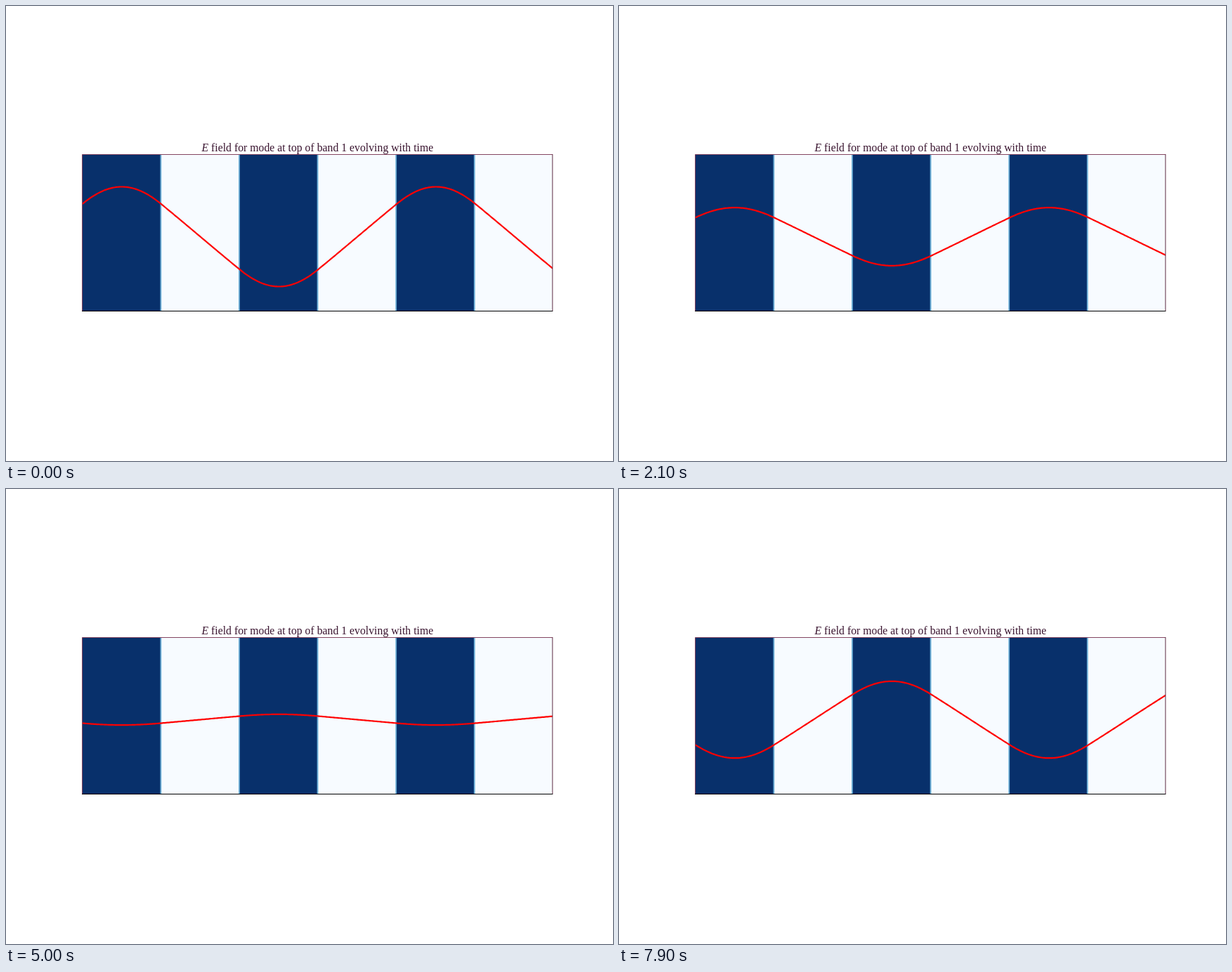
Recreate the animation shown at these times as an HTML page. Size 864x648 px, loop 8000 ms.

```html
<!DOCTYPE html>
<html lang="en">
<head>
<meta charset="utf-8">
<title>Mode evolving with time</title>
<style>
  html, body { margin: 0; width: 100%; height: 100%; overflow: hidden; background: #fff; }
  svg { display: block; }
  text { font: 15.78px "Liberation Serif", serif; fill: #3a1530; }
</style>
</head>
<body>
<svg width="864" height="648" viewBox="0 0 864 648">
  <text x="278.5" y="206.5"><tspan font-style="italic">E</tspan> field for mode at top of band 1 evolving with time</text>
  <rect x="108" y="211" width="670" height="224" fill="#f7fbff"/>
  <g id="layers"></g>
  <clipPath id="plot"><rect x="108" y="211" width="670" height="224"/></clipPath>
  <path id="wave" clip-path="url(#plot)" fill="none" stroke="#f00" stroke-width="2.2" stroke-linejoin="round"/>
  <path d="M108.5 434V211.5H778" fill="none" stroke="#844560"/>
  <path d="M777.9 211V434" stroke="#5c2a42"/>
  <path d="M108 434.5H778.4" stroke="#000"/>
</svg>
<script>
const LEFT = 108.8, LAYER = 111.6, MID = 328.5;
const WAVE_LAYER = 111.86; // the curve is plotted slightly wider than the layers
const HIGH = 0.8545, LOW = HIGH / Math.sqrt(13); // phase across half a layer

let layers = '';
for (let i = 0; i < 3; i++) {
  const x = LEFT + 2 * i * LAYER;
  layers += `<rect x="${x}" y="211" width="${LAYER}" height="224" fill="#08306b"/>`;
}
for (let i = 1; i < 6; i++) {
  layers += `<rect x="${LEFT + i * LAYER - 0.9}" y="211" width="1.8" height="224" fill="#6baed6"/>`;
}
document.getElementById('layers').innerHTML = layers;

// Standing mode: cosine in the dark layers, matched sine in the light ones.
function field(x) {
  const u = (x - LEFT) / WAVE_LAYER, n = Math.floor(u);
  const s = 2 * (u - n) - 1, sign = (n >> 1) % 2 ? -1 : 1;
  return sign * (n % 2 ? -Math.cos(HIGH) * Math.sin(LOW * s) / Math.sin(LOW) : Math.cos(HIGH * s));
}

const shape = [];
for (let x = LEFT; x < 780; x += 1.86) shape.push([x, field(x)]);

const wave = document.getElementById('wave');
const start = performance.now();
function draw() {
  const elapsed = Math.max(0, performance.now() - start);
  const step = Math.floor(elapsed % 8000 / 100);
  const amp = 99.4 * Math.sin((45.6 - step) * Math.PI / 180);
  wave.setAttribute('d', 'M' + shape.map(([x, f]) => `${x.toFixed(2)} ${(MID - amp * f).toFixed(2)}`).join('L'));
  requestAnimationFrame(draw);
}
draw();
</script>
</body>
</html>
```
